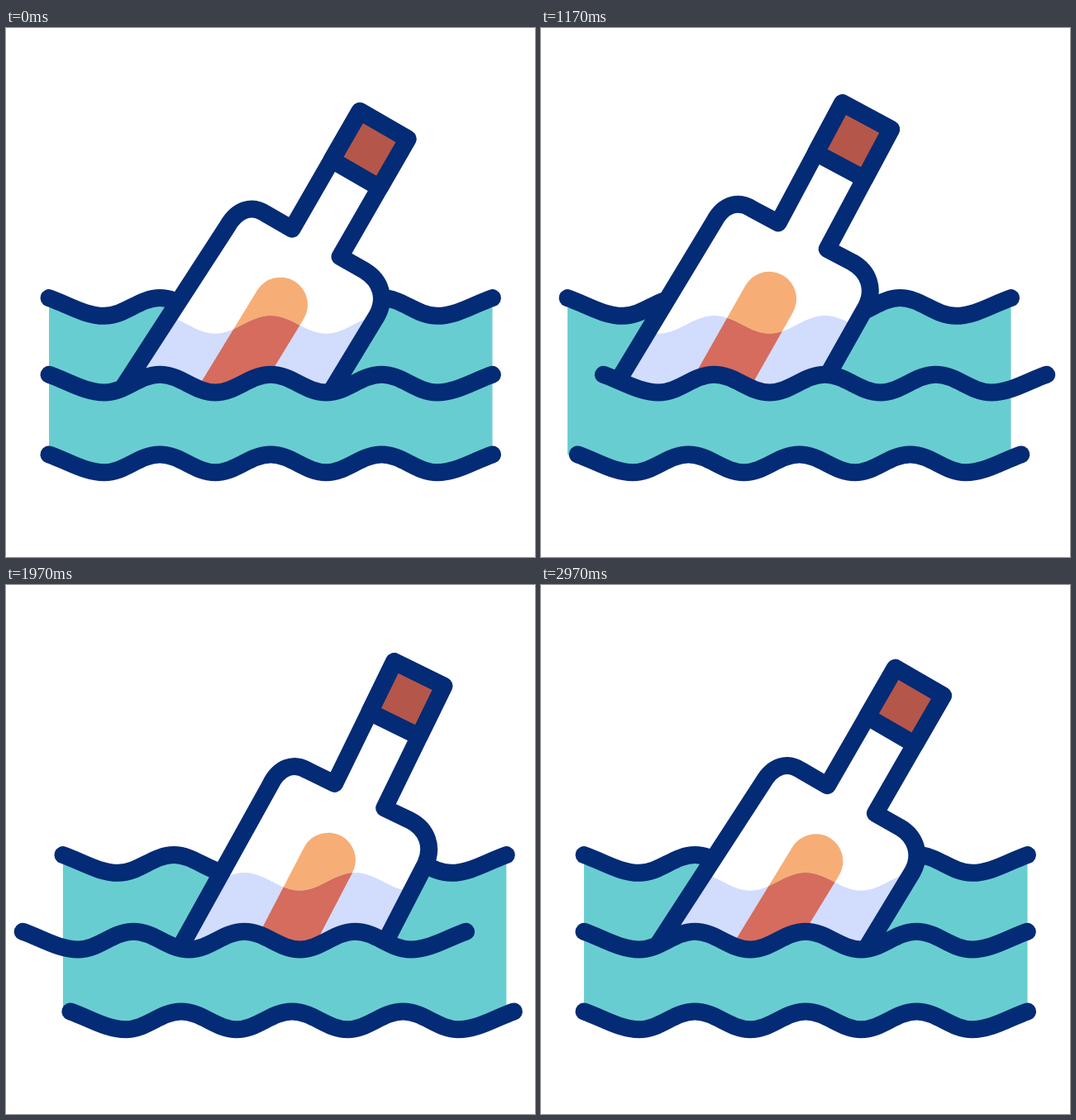
An HTML page with a canvas for the animation above (3000 ms loop, 640 by 640 pixels).

```html
<!DOCTYPE html>
<html lang="en">
<head>
<meta charset="utf-8">
<title>Bottle at sea</title>
<style>
html, body { margin: 0; width: 100%; height: 100%; overflow: hidden; background: #fff; }
canvas { display: block; width: 640px; height: 640px; }
</style>
</head>
<body>
<canvas id="stage" width="640" height="640"></canvas>
<script>
const ctx = document.getElementById('stage').getContext('2d');
const LOOP = 3000;
const NAVY = '#042b75', TEAL = '#68cdd1', GLASS_WATER = '#d2dcfd';
const PAPER = '#f6ae76', WET_PAPER = '#d56c5e', CORK = '#b45649';
const LEFT = 52, HALF = 67.06, DEPTH = 21.7, WIDTH = 8 * HALF;
const TOP_Y = 326.6, MID_Y = 419.3, LOW_Y = 516;
const PIVOT_X = 300, PIVOT_Y = 340;

// Eases through poses spread evenly over the loop.
function cycle(t, ...poses) {
  const n = poses.length;
  const at = (t / LOOP % 1) * n, i = Math.floor(at), p = at - i;
  const a = poses[i], b = poses[(i + 1) % n];
  return a + (b - a) * p * p * (3 - 2 * p);
}

// Adds four troughs, with straighter slopes at both ends.
function addWave(path, x, y) {
  const low = y + DEPTH, end = x + WIDTH, h = 25;
  path.lineTo(x, y);
  path.bezierCurveTo(x + 22, y + 7.5, x + HALF - 24, low, x + HALF, low);
  for (let i = 1; i < 7; i++) {
    const from = i % 2 ? low : y, to = i % 2 ? y : low;
    const a = x + i * HALF, b = a + HALF;
    path.bezierCurveTo(a + h, from, b - h, to, b, to);
  }
  path.bezierCurveTo(end - HALF + 24, low, end - 22, y + 7.5, end, y);
}

function waveLine(x, y) {
  const path = new Path2D();
  addWave(path, x, y);
  return path;
}

// Everything between a wave and a level edge
function waveRegion(x, y, edge) {
  const path = new Path2D();
  path.moveTo(0, edge);
  path.lineTo(0, y);
  addWave(path, x, y);
  path.lineTo(640, y);
  path.lineTo(640, edge);
  return path;
}

function sea(x) {
  const path = waveLine(x, TOP_Y);
  path.lineTo(x + WIDTH, LOW_Y);
  path.lineTo(x, LOW_Y);
  path.closePath();
  path.moveTo(x, LOW_Y);
  addWave(path, x, LOW_Y);
  return path;
}

const bottle = new Path2D(
  'M106 490 L268 240 C280 219 298 214 314 225 L346 243.5 L428 101 ' +
  'L486 134.5 L404 277 L434 294 C454 306 460 328 449 348 L363 490');
const cork = new Path2D('M428 101 L486 134.5 L452 193.5 L394 160 Z');
const scroll = new Path2D('M332 335 L235 494');

function stroke(path, color = NAVY, width = 21) {
  ctx.strokeStyle = color;
  ctx.lineWidth = width;
  ctx.stroke(path);
}

function fill(path, color) {
  ctx.fillStyle = color;
  ctx.fill(path);
}

function clipped(region, paint) {
  ctx.save();
  ctx.clip(region);
  paint();
  ctx.restore();
}

function posed(t, paint) {
  const x = cycle(t, 0, -20, -72, -12, 59, 36);
  const y = cycle(t + 60, -1, 16, 0, -14, 0, -17);
  const tilt = cycle(t, 0, 4, -4, 4, -4, 4);
  ctx.save();
  ctx.translate(PIVOT_X + x, PIVOT_Y + y);
  ctx.rotate(tilt * Math.PI / 180);
  ctx.translate(-PIVOT_X, -PIVOT_Y);
  paint();
  ctx.restore();
}

function draw(t) {
  const topX = LEFT + cycle(t, 0, -23, 17);
  const midX = LEFT + cycle(t, 0, 28, -32);
  const lowX = LEFT + cycle(t, 0, -10.5, 26);
  const contents = (glass, paper) => posed(t, () => {
    fill(bottle, glass);
    stroke(scroll, paper, 66);
  });

  ctx.clearRect(0, 0, 640, 640);
  ctx.lineCap = ctx.lineJoin = 'round';

  fill(sea(topX), TEAL);
  stroke(waveLine(topX, TOP_Y));

  clipped(waveRegion(midX, MID_Y, 0), () => {
    contents('#fff', PAPER);
    clipped(waveRegion(midX, MID_Y - 71.2, 640), () => contents(GLASS_WATER, WET_PAPER));
    posed(t, () => {
      fill(cork, CORK);
      stroke(cork);
      stroke(bottle);
    });
  });

  stroke(waveLine(midX, MID_Y));
  stroke(waveLine(lowX, LOW_Y));
}

function tick() {
  draw(performance.now());
  requestAnimationFrame(tick);
}
tick();
</script>
</body>
</html>
```
